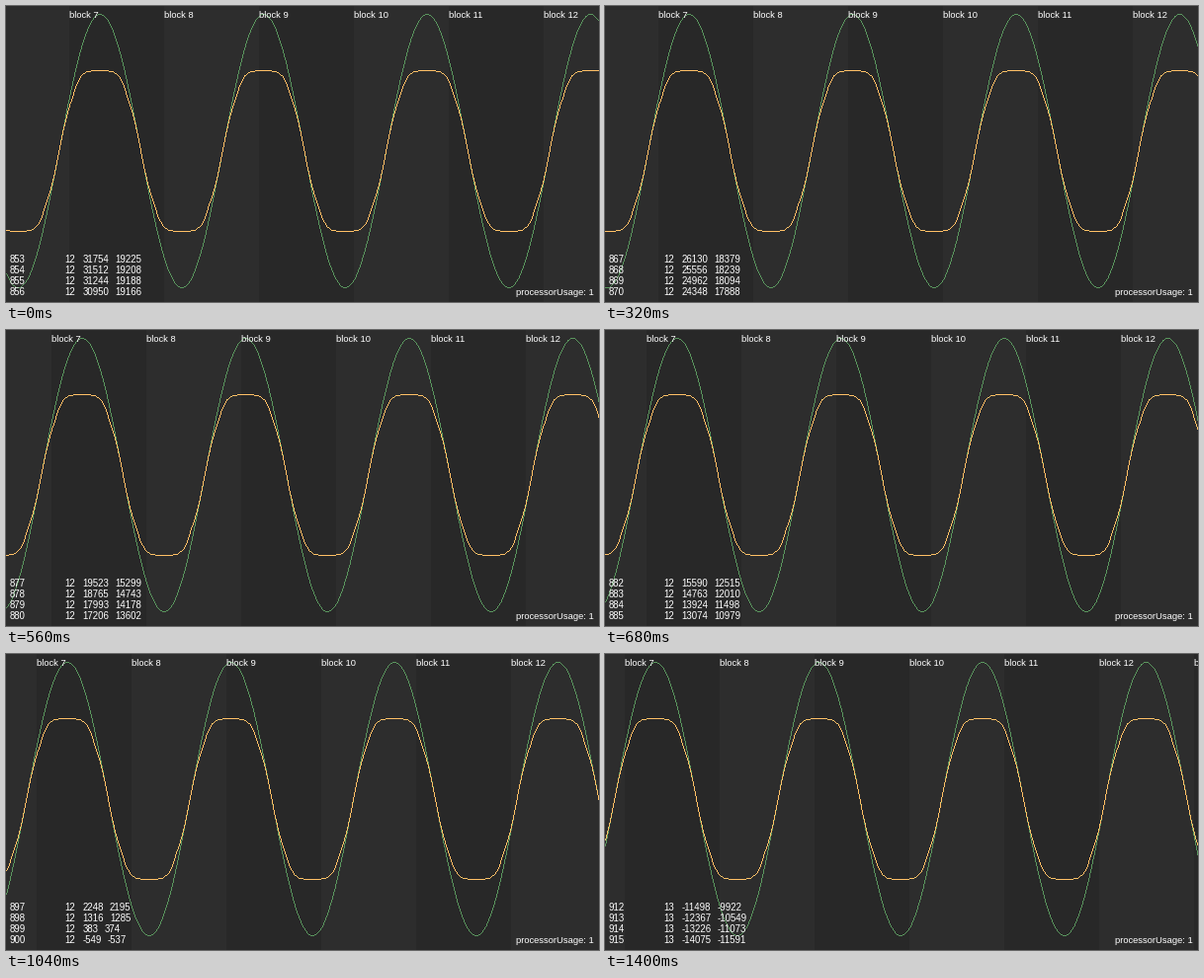
A matplotlib script for the animation above (1440 ms loop, 600 by 300 pixels).

```python
import math

import numpy as np
import matplotlib.pyplot as plt
from matplotlib.animation import FuncAnimation
from matplotlib.colors import to_rgba
from matplotlib.patches import Rectangle

W, H, DPI = 600, 300, 100
FRAMES, INTERVAL = 36, 40

PX = 72 / DPI            # one pixel in points
LABEL_PX, NUMBER_PX = 9.4, 9.6
STEP = 0.75              # pixels per sample
BLOCK_W = 96             # pixels per block
FIRST_SAMPLE = 856       # newest sample when the loop starts
BLOCK_13_START = 909

PEAK = 32764
OMEGA = 0.028484         # radians per sample
ZERO = 899.411           # sample of a falling zero crossing
MID, SCALE = 147, 236.6

DARK, LIGHT = "#282828", "#2d2d2d"
GREEN, ORANGE, WHITE = "#5a965e", "#ffc066", "#ffffff"

# Soft clipper: nine evenly spaced knots, mirrored for negative input
CURVE = np.array([0, 4000, 7500, 10500, 13000, 16000, 18000, 19000, 19300])
KNOT_Y = np.concatenate([-CURVE[:0:-1], CURVE])
KNOT_X = 4096 * np.arange(-8, 9)


def tone(n):
    return np.trunc(PEAK * np.sin(OMEGA * (ZERO - n)))


def clip(v):
    return np.floor(np.interp(v, KNOT_X, KNOT_Y))


def newest(k):
    return FIRST_SAMPLE + math.floor(1.69 * k + 0.7)


def text_width(number):
    return NUMBER_PX * sum(0.333 if c == "-" else 0.556 for c in number)


def plot_pixels(canvas, values, color):
    """Join one value per column with a line exactly one pixel thick."""
    ys = np.floor(MID - values / SCALE).astype(int)
    for x, (y0, y1) in enumerate(zip(ys[:-1], ys[1:])):
        steps = max(abs(y1 - y0), 1)
        t = np.arange(steps + 1) / steps
        px = np.floor(x + t + 0.5).astype(int)
        py = np.floor(y0 + (y1 - y0) * t + 0.5).astype(int)
        seen = px < W
        canvas[py[seen], px[seen]] = to_rgba(color)


fig = plt.figure(figsize=(W / DPI, H / DPI), dpi=DPI, facecolor=LIGHT)
ax = fig.add_axes([0, 0, 1, 1])


def label(x, y, s="", size=LABEL_PX, ha="left"):
    return ax.text(x, y, s, color=WHITE, family="Liberation Sans",
                   size=size * PX, ha=ha, va="baseline",
                   clip_on=True, zorder=5)


blocks = []
for number in range(6, 14):
    shade = DARK if number % 2 else LIGHT
    band = Rectangle((0, 0), BLOCK_W, H, color=shade, lw=0,
                     antialiased=False, zorder=1)
    ax.add_patch(band)
    blocks.append((number, band, label(0, 12, f"block {number}")))

screen = ax.imshow(np.zeros((H, W, 4)), extent=(0, W, H, 0), aspect="auto",
                   interpolation="nearest", zorder=3)
rows = [[label(x, 260 + 11 * r, size=NUMBER_PX) for x in (4, 59.7, 77.5, 110)]
        for r in range(4)]
label(595, 293, "processorUsage: 1", ha="right")

ax.set_xlim(0, W)
ax.set_ylim(H, 0)
ax.axis("off")


def draw(k):
    now = newest(k)
    scroll = math.ceil(STEP * (now - FIRST_SAMPLE) - 0.5)

    for number, band, name in blocks:
        x = 64 + BLOCK_W * (number - 7) - scroll
        band.set_x(x)
        name.set_x(x)

    columns = np.arange(W + 1) + 0.25
    wave = tone(FIRST_SAMPLE + (columns + scroll - W) / STEP)
    canvas = np.zeros((H, W, 4))
    plot_pixels(canvas, wave, GREEN)
    plot_pixels(canvas, clip(wave), ORANGE)
    screen.set_data(canvas)

    for r, cells in enumerate(rows):
        sample = now - 3 + r
        value = tone(sample)
        raw, out = str(int(value)), str(int(clip(value)))
        block = "13" if sample >= BLOCK_13_START else "12"
        for cell, s in zip(cells, (str(sample), block, raw, out)):
            cell.set_text(s)
        cells[3].set_x(77.5 + text_width(raw) + 6.2)
    return []


anim = FuncAnimation(fig, draw, frames=FRAMES, interval=INTERVAL,
                     init_func=lambda: draw(0), repeat=True, repeat_delay=0)
plt.show()
```
